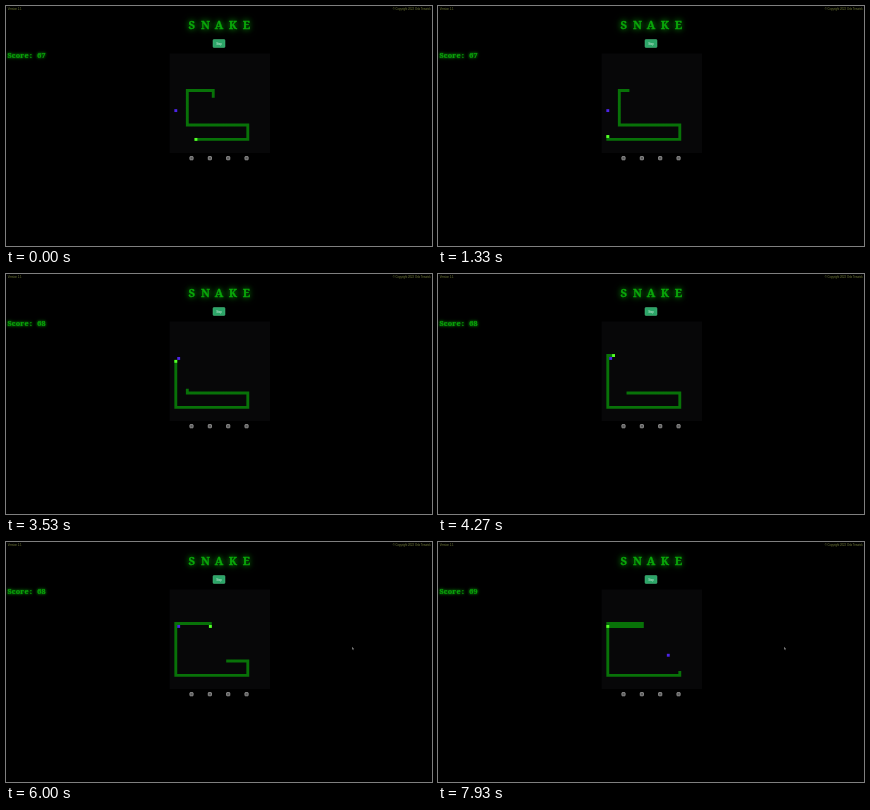
Write an HTML page that moves like this. It is 426 by 240 pixels and loops after 8 s.

```html
<!DOCTYPE html>
<html lang="en">
<head>
<meta charset="utf-8">
<title>Snake</title>
<style>
  html, body { margin: 0; width: 100%; height: 100%; overflow: hidden; background: #000; }
  svg { display: block; width: 100vw; height: 100vh; }
  text { text-anchor: middle; }
  .slab { font-family: "Noto Serif", serif; font-weight: 700; }
  .small { font-family: "Liberation Sans", sans-serif; font-size: 2.75px; fill: #77803c; }
  #title {
    font-size: 11.3px; fill: #0aa80a; stroke: #0aa80a; stroke-width: .3;
    filter: drop-shadow(0 0 2.4px #066006) drop-shadow(0 0 3px #064806);
  }
  #score {
    font-size: 7.2px; fill: #0aa00a; stroke: #0aa00a; stroke-width: .2;
    filter: drop-shadow(0 0 1.2px #086408) drop-shadow(0 0 1.5px #065006);
  }
  #cursor { animation: appear 8s step-end infinite; }
  @keyframes appear { 0% { opacity: 0 } 54% { opacity: 1 } }
</style>
</head>
<body>
<svg viewBox="0 0 426 240">
  <rect width="426" height="240"/>
  <text class="small" x="1.8" y="3.9" style="text-anchor:start">Version 1.1</text>
  <text class="small" x="424.6" y="3.9" style="text-anchor:end">© Copyright 2022 Orla Tenwick</text>
  <text id="title" class="slab" y="22.8"></text>
  <rect x="207" y="33.5" width="12" height="8" rx=".9" fill="#2ca568" stroke="#48b87c" stroke-width=".5"/>
  <text class="small" x="213" y="38.5" style="fill:#e4f6ec">Stop</text>
  <text id="score" class="slab" y="52.3"></text>
  <rect x="163.6" y="47.5" width="100.5" height="99.5" fill="#070708"/>
  <path id="body" fill="#087208"/>
  <rect id="food" width="2.88" height="2.88" fill="#4d24e8"/>
  <rect id="head" width="2.88" height="2.88" fill="#55ff28"/>
  <g id="icons" fill="#585858" stroke="#a0a0a0" stroke-width=".8"></g>
  <path id="cursor" d="M346 104.8v3l.7-.6.5 1 .5-.3-.4-1h.9z" fill="#777"/>
</svg>
<script>
  const LOOP = 8000, FRAME = 1000 / 15, CELL = 2.88;
  const MOVES_PER_SECOND = 6.38, PHASE = 0.475, LAST_MOVE = 50;
  const $ = id => document.getElementById(id);
  const cellX = col => 168.36 + col * CELL;
  const cellY = row => 131.96 - row * CELL;

  // Rows count upwards from the snake's lowest run.
  const steps = { U: [0, 1], D: [0, -1], L: [-1, 0], R: [1, 0] };
  const trail = [[13, 15]];
  for (const [, dir, count] of "U2 L9 D12 R21 D5 L25 U18 R12 D1 L12".matchAll(/(\w)(\d+)/g)) {
    for (let i = 0; i < +count; i++) {
      const [col, row] = trail[trail.length - 1];
      trail.push([col + steps[dir][0], row + steps[dir][1]]);
    }
  }
  const START = trail.length - 1 - LAST_MOVE;
  const meals = [17, 49];
  const foods = [[0, 10], [1, 17], [21, 7]];

  function spaced(id, text, x, pitch) {
    $(id).setAttribute("x", [...text].map((_, i) => (x + i * pitch).toFixed(2)).join(" "));
    $(id).textContent = text;
  }

  function place(id, [col, row]) {
    $(id).setAttribute("x", cellX(col));
    $(id).setAttribute("y", cellY(row));
  }

  let shown = -1;
  function draw(move) {
    if (move === shown) return;
    shown = move;
    const eaten = meals.filter(m => move >= m).length;
    const cells = trail.slice(move - eaten, START + move + 1);
    $("body").setAttribute("d", cells.map(([col, row]) =>
      `M${cellX(col).toFixed(2)} ${cellY(row).toFixed(2)}h${CELL}v${CELL}h-${CELL}z`).join(""));
    place("head", trail[START + move]);
    place("food", foods[eaten]);
    spaced("score", "Score:\u00a0" + (67 + eaten), 3.5, 4.25);
  }

  spaced("title", "SNAKE", 185.7, 13.7);
  for (let i = 0; i < 4; i++) {
    const icon = document.createElementNS("http://www.w3.org/2000/svg", "rect");
    const box = { x: 183.9 + i * 18.35, y: 150.6, width: 3.2, height: 3.2, rx: 0.4 };
    for (const key in box) icon.setAttribute(key, box[key]);
    $("icons").append(icon);
  }

  const origin = performance.now();
  function tick() {
    const time = (performance.now() - origin) % LOOP;
    const seconds = Math.floor((time + 4) / FRAME) % 120 * FRAME / 1000;
    draw(Math.min(LAST_MOVE, Math.floor(seconds * MOVES_PER_SECOND + PHASE)));
    requestAnimationFrame(tick);
  }
  tick();
</script>
</body>
</html>
```
